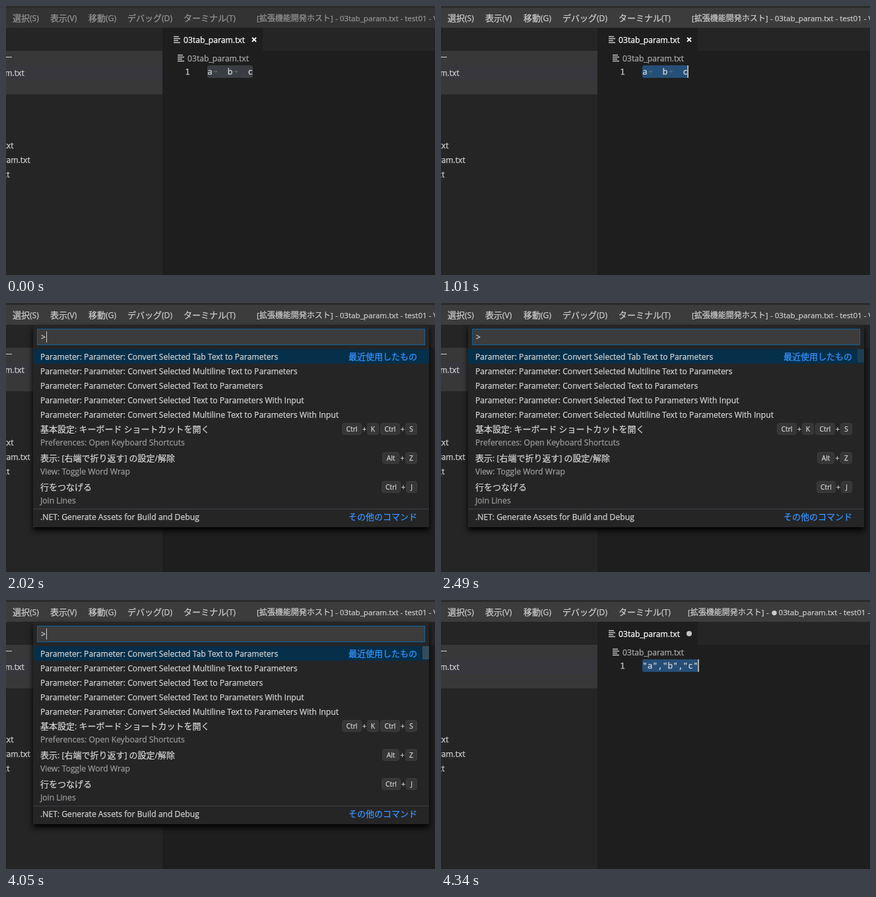
These frames come from a looping animation (650x408 px, 4590 ms). An HTML page:

```html
<!DOCTYPE html>
<html lang="ja">
<head>
<meta charset="utf-8">
<style>
html, body { margin: 0; width: 100%; height: 100%; overflow: hidden; background: #1e1e1e; }
svg { display: block; }
text { white-space: pre; stroke-width: .25px; font-family: "Open Sans", "Noto Sans CJK JP", "Noto Sans CJK", sans-serif; }
.code { font: 12.83px "Noto Sans Mono", monospace; }
#box { filter: drop-shadow(0 5px 4px #000); }
</style>
</head>
<body>
<svg id="stage" width="650" height="408" viewBox="0 0 650 408"></svg>
<script>
const LOOP = 4590;
const LATIN = 12.15 / 13;
const stage = document.getElementById('stage');

const rect = (x, y, w, h, fill, more = '') =>
  `<rect x="${x}" y="${y}" width="${w}" height="${h}" fill="${fill}" ${more}/>`;
const group = (id, body, more = '') => `<g id="${id}" ${more}>${body}</g>`;

// Japanese runs use the full size, Latin runs a slightly smaller one.
// A hairline stroke in the text colour gives the dense look of hinted type.
function label(x, y, str, fill = '#d2d2d2', size = 13, anchor = 'start', latin = LATIN) {
  const runs = str.match(/[\u3000-\u9fff]+|[^\u3000-\u9fff]+/g).map(run => {
    const px = /[\u3000-\u9fff]/.test(run) ? size : run === '●' ? 8 : size * latin;
    return `<tspan font-size="${px}">${run}</tspan>`;
  });
  return `<text x="${x}" y="${y}" fill="${fill}" stroke="${fill}" text-anchor="${anchor}">${runs.join('')}</text>`;
}
const title = (x, str) => label(x, 23, str, 'inherit', 12, 'start', 11.6 / 12);
const code = (x, str, fill = '#d4d4d4') =>
  `<text class="code" x="${x}" y="104" fill="${fill}" stroke="${fill}">${str}</text>`;
const lines = (x, y) =>
  `<path d="M${x} ${y}h8m-8 3h10m-10 3h7m-7 3h10" stroke="#c5c5c5" stroke-width="1.3"/>`;
const arrow = x =>
  `<path d="M${x} 99.5h5m-2 -2l2 2l-2 2" fill="none" stroke="#e3e4e2" stroke-opacity=".22"/>`;

function key(x, w, y, str) {
  return rect(x + .5, y - 8.5, w - 1, 17, '#363637', 'rx="3" stroke="#3d3d3e"') +
    label(x + w / 2, y + 4, str, '#d2d2d2', 11, 'middle');
}
const plus = (x, y) => label(x, y + 4, '+', '#d2d2d2', 12, 'middle');

function palette() {
  const command = 'Parameter: Parameter: Convert Selected ';
  const single = ['Tab Text to Parameters', 'Multiline Text to Parameters', 'Text to Parameters',
    'Text to Parameters With Input', 'Multiline Text to Parameters With Input'];
  const double = [
    ['基本設定: キーボード ショートカットを開く', 'Preferences: Open Keyboard Shortcuts'],
    ['表示: [右端で折り返す] の設定/解除', 'View: Toggle Word Wrap'],
    ['行をつなげる', 'Join Lines']];
  return rect(41, 33, 600, 307, '#252526', 'id="box"') +
    rect(47.5, 39.5, 587, 24, '#3c3c3c', 'stroke="#0e639c"') +
    label(53, 56, '>') +
    rect(41, 70, 600, 22, '#062f4a') +
    single.map((s, i) => label(52, 86 + 22 * i, command + s)).join('') +
    double.map(([a, b], i) => label(52, 196 + 44 * i, a) +
      label(52, 216 + 44 * i, b, '#9b9b9b')).join('') +
    label(623, 86, '最近使用したもの', '#3794ff', 13, 'end') +
    key(509, 30, 191, 'Ctrl') + plus(543, 191) + key(547, 18, 191, 'K') +
    key(567, 30, 191, 'Ctrl') + plus(601, 191) + key(605, 18, 191, 'S') +
    key(570, 26, 235, 'Alt') + plus(600.5, 235) + key(605, 18, 235, 'Z') +
    key(569, 29, 279, 'Ctrl') + plus(602, 279) + key(606, 17, 279, 'J') +
    rect(41, 312, 600, 1, '#3f3f46') +
    label(52, 329, '.NET: Generate Assets for Build and Debug') +
    label(623, 329, 'その他のコマンド', '#3794ff', 13, 'end') +
    rect(61, 43, 1, 17, '#ccc', 'id="inputCaret"') +
    rect(631, 70, 10, 20, '#797979', 'id="scrollbar"');
}

const menus = [[10, '選択(S)'], [67, '表示(V)'], [125, '移動(G)'], [184, 'デバッグ(D)'], [269, 'ターミナル(T)']];

stage.innerHTML =
  rect(0, 0, 650, 408, '#1e1e1e') +
  rect(0, 0, 650, 3, '#2b2b2b') +
  rect(0, 3, 650, 30, '#3c3c3c', 'id="bar"') +
  group('head',
    menus.map(([x, s]) => label(x, 23, s, 'inherit')).join('') +
    group('oldTitle', title(380, '[拡張機能開発ホスト]') + title(499, '- 03tab_param.txt - test01 - Visual')) +
    group('newTitle', title(374, '[拡張機能開発ホスト]') + title(493, '-') + title(501, '●') +
      title(511.5, '03tab_param.txt - test01 - Visual'))) +
  // Side bar
  rect(0, 33, 237, 375, '#252526') +
  rect(0, 68, 237, 66, '#383838') +
  rect(0, 90, 237, 22, '#37373d') +
  label(9.5, 82, '開いているエディター', '#d2d2d2', 11, 'end') +
  label(27.7, 106, '03tab_param.txt', '#d2d2d2', 13, 'end') +
  label(11.5, 216, '01.txt', '#d2d2d2', 13, 'end') +
  label(36.7, 238, '03tab_param.txt', '#d2d2d2', 13, 'end') +
  label(5.5, 260, '04.txt', '#d2d2d2', 13, 'end') +
  // Tab and breadcrumb
  rect(389, 33, 261, 35, '#252526') +
  lines(254, 46.5) + label(269, 56, '03tab_param.txt', '#fff') +
  group('cross', '<path d="M373 48l6 6m0 -6l-6 6" stroke="#fff" stroke-width="1.8"/>') +
  group('dirty', '<circle cx="376" cy="51" r="4" fill="#c5c5c5"/>') +
  lines(260, 74.5) + label(275, 84, '03tab_param.txt', '#a9a9a9') +
  // Editor line
  code(271.3, '1', '#c6c6c6') +
  group('lineMark', rect(305, 90, 343, 2, '#282828') + rect(305, 107, 343, 2, '#282828')) +
  rect(367, 90, 7, 19, '#474747', 'id="wordMark"') +
  rect(305, 90, 69, 19, '#264f78', 'id="selection" rx="3"') +
  group('oldCode', code(305, 'a') + code(335.8, 'b') + code(366.6, 'c') + arrow(314.5) + arrow(345.3)) +
  group('newCode', code(305, '"a","b","c"')) +
  rect(373, 90, 2, 19, '#aeafad', 'id="caret"') +
  group('palette', palette());

const el = id => document.getElementById(id);
const show = (id, on) => el(id).setAttribute('visibility', on ? 'inherit' : 'hidden');
const set = (id, name, value) => el(id).setAttribute(name, value);

function draw(t) {
  const within = (a, b) => t >= a && t < b;
  const focused = t >= 230;
  const done = t >= 4340;

  set('bar', 'fill', focused ? '#3c3c3c' : '#333334');
  for (const paint of ['fill', 'stroke']) set('head', paint, focused ? '#cccccc' : '#959595');
  for (const part of ['Title', 'Code']) {
    show('old' + part, !done);
    show('new' + part, done);
  }
  show('cross', !done);
  show('dirty', done);

  show('lineMark', within(230, 1010));
  show('wordMark', within(380, 1010));
  show('selection', !within(230, 1010));
  set('selection', 'fill', focused ? '#264f78' : '#3a3d41');
  set('selection', 'width', done ? 85 : 69);
  show('caret', within(230, 640) || within(1010, 1560) || t >= 4280);
  set('caret', 'x', done ? 389 : 373);

  show('palette', within(2020, 4280));
  show('inputCaret', within(2020, 2490) || within(3040, 3590) || t >= 4050);
  set('scrollbar', 'opacity', t < 2490 ? 0 : t < 2570 ? .2 : .4);
}

const start = performance.now();
function tick() {
  draw((performance.now() - start) % LOOP);
  requestAnimationFrame(tick);
}
tick();
</script>
</body>
</html>
```
